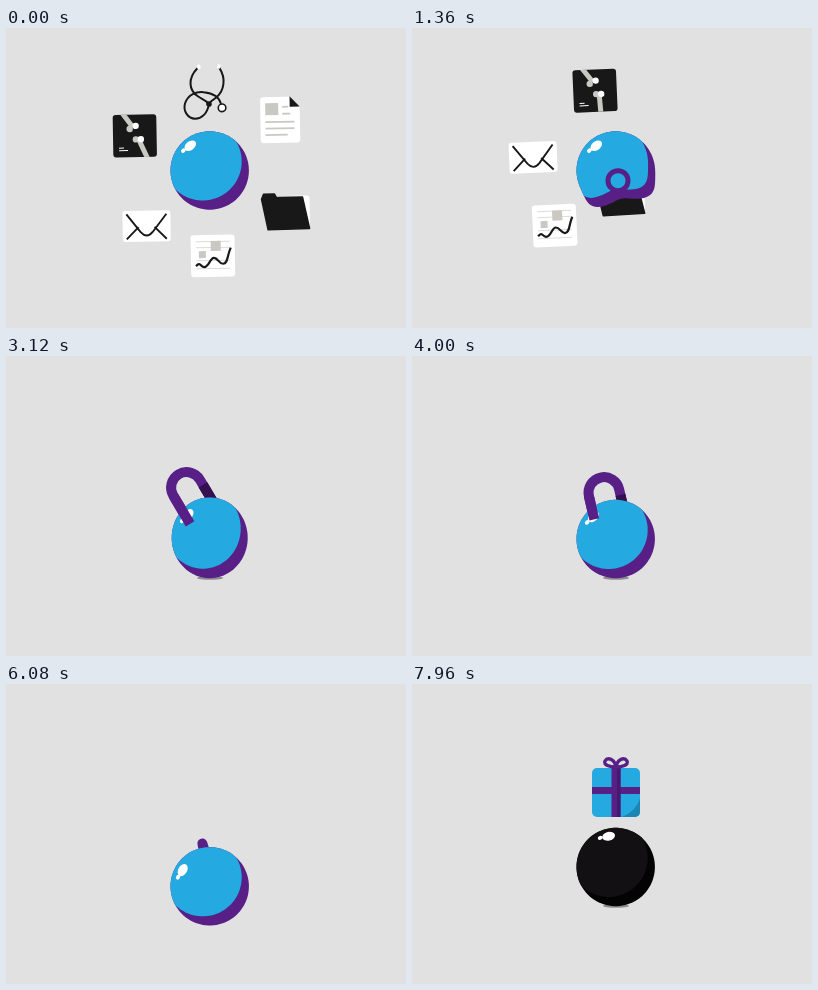
Write an HTML page with a canvas that moves like this. It is 400 px wide and 300 px high and loops after 8000 ms.

```html
<!DOCTYPE html>
<html>
<head>
<meta charset="utf-8">
<style>
  html, body { margin: 0; width: 100%; height: 100%; overflow: hidden; background: #e1e1e1; }
  canvas { display: block; width: 100vw; height: 100vh; }
</style>
</head>
<body>
<canvas id="stage" width="400" height="300"></canvas>
<script>
const ctx = document.getElementById('stage').getContext('2d');
const BLUE = '#25a9e1', PURPLE = '#581f87', DARK_PURPLE = '#35104f';
const BLACK = '#181818', WHITE = '#fff', GREY = '#c9c8c3';
const { PI, sin, cos, exp, min, max } = Math;
const rad = deg => deg * PI / 180;
const clamp = u => max(0, min(1, u));
const mix = (a, b, u) => a + (b - a) * u;
const smooth = u => (u = clamp(u), u * u * (3 - 2 * u));

function fill(color) { ctx.fillStyle = color; ctx.fill(); }
function stroke(color, width) {
  ctx.strokeStyle = color;
  ctx.lineWidth = width;
  ctx.stroke();
}
function box(x, y, w, h, color, r = 0) {
  ctx.beginPath();
  ctx.roundRect(x, y, w, h, r);
  fill(color);
}
function dot(x, y, rx, color, ry = rx, turn = 0) {
  ctx.beginPath();
  ctx.ellipse(x, y, rx, ry, turn, 0, 2 * PI);
  fill(color);
}
function poly(...p) {
  ctx.beginPath();
  for (let i = 0; i < p.length; i += 2) ctx.lineTo(p[i], p[i + 1]);
}
function line(color, width, ...p) { poly(...p); stroke(color, width); }
function curve(d, color, width) {
  ctx.strokeStyle = color;
  ctx.lineWidth = width;
  ctx.stroke(new Path2D(d));
}
function placed(x, y, turn, draw) {
  ctx.save();
  ctx.translate(x, y);
  ctx.rotate(turn);
  draw();
  ctx.restore();
}

// Icons, each drawn around its own centre
function stethoscope() {
  curve('M-8-20C-18-10-17 2-8 8C-4 11 0 12 2 15M14-20C21-9 18 3 11 9C7 12 4 14 2 16', BLACK, 2);
  curve('M3 16C1 26-5 30.5-11 30.5C-19 30-23 22-21 15C-18 6-9 3-2 4C7 5 13 8 15 16', BLACK, 2);
  line(WHITE, 4, -8, -21, -5, -22);
  line(WHITE, 4, 12, -22, 15, -21);
  dot(3, 16, 2.8, BLACK);
  dot(16, 20, 3.8, WHITE);
  stroke(BLACK, 1.6);
}
function report() {
  box(-20, -23, 39.5, 46, WHITE, 3);
  poly(9, -24, 20, -24, 20, -13);
  fill('#e1e1e1');
  poly(9.5, -23.5, 19.5, -13, 9.5, -13);
  fill(BLACK);
  box(-15, -17, 13, 12, GREY);
  for (const [y, x, w] of [[-14, 2, 6], [-7, 2, 8], [1, -15, 29], [7.5, -15, 29], [14, -15, 22]])
    box(x, y, w, 1.8, GREY);
}
function folder() {
  box(-18, -16, 41, 33, WHITE, 3);
  poly(-25, -13, -23, -18, -12, -18, -10, -14.5, 16, -14.5, 22.5, 17, -19, 17.5);
  ctx.closePath();
  ctx.lineJoin = 'round';
  fill(BLACK);
  stroke(BLACK, 1.5);
}
function chart() {
  box(-22, -21, 44, 42, WHITE, 3);
  for (const y of [-15, -9, 4, 12]) box(-17, y, 34, 1, '#dcdcd8');
  box(-2, -15, 10, 10, GREY);
  box(-14, -5, 7, 7, GREY);
  curve('M-17 10C-13 5-12 11-9 11C-4 11-3 2 1 2C5 2 6 8 10 8C15 8 14 0 18-8', BLACK, 2.2);
}
function envelope() {
  box(-24, -15.5, 48, 31, WHITE, 3);
  curve('M-20-12L-6 6Q0 13 6 6L20-12M-20 13L-8 1M20 13L8 1', BLACK, 1.9);
}
function xray(t) {
  box(-21.8, -21.2, 43.6, 42.4, BLACK, 3);
  ctx.save();
  ctx.clip();
  line(GREY, 5, -2, -9, -13, -24);
  line(GREY, 5, 4, 4, mix(13, 5, clamp(t / 1360)), 24);
  for (const x of [-5, 1]) dot(x, x < 0 ? -7 : -10, 3.2, x < 0 ? GREY : WHITE);
  for (const x of [1, 6]) dot(x, 3.5, 3.2, x < 5 ? GREY : WHITE);
  ctx.restore();
  box(-16, 11.5, 5, 1, WHITE);
  box(-16, 14, 9, 1, WHITE);
}

// [draw, start angle, orbit radius]
const icons = [[stethoscope, -93, 83], [report, -36, 87], [folder, 28, 87],
  [chart, 88, 85], [envelope, 139, 84], [xray, 205, 83]];
const orbitAngle = (start, t) => rad(start + 0.037 * t);
const sinceSuction = (i, t) => t - 618 - 226 * i;

function drawIcons(t) {
  icons.forEach(([draw, start, radius], i) => {
    const p = sinceSuction(i, t), u = clamp(p / 350);
    if (u >= 1) return;
    const a = orbitAngle(start, t), d = radius * (1 - u * u);
    const tilt = -1 - 1.5 * clamp(t / 560) - 12 * u * u * (1 - sin(a));
    placed(204 + d * cos(a), 143 + d * sin(a), rad(tilt), () => draw(t));
  });
}
function drawRings(t) {
  icons.forEach(([, start], i) => {
    const p = sinceSuction(i, t);
    if (p < 232 || p > 298) return;
    const a = orbitAngle(start, t), d = 59 - 1.26 * (p - 252), u = clamp((59 - d) / 48);
    ctx.beginPath();
    ctx.arc(204 + d * cos(a), 143 + d * sin(a), mix(12, 10, u), 0, 2 * PI);
    stroke(d < 40 ? PURPLE : BLUE, mix(2, 5, u));
  });
}
function dentsAt(t) {
  return icons.flatMap(([, start], i) => {
    const q = sinceSuction(i, t) - 182;
    if (q < 0 || q > 400) return [];
    return [[orbitAngle(start, t), 24 * sin(PI * q / 170) * exp(-q / 150)]];
  });
}

function blob(cx, cy, r, dents) {
  ctx.beginPath();
  for (let i = 0; i < 90; i++) {
    const a = i * PI / 45;
    let d = r;
    for (const [at, depth] of dents) {
      const off = Math.abs(Math.atan2(sin(a - at), cos(a - at)));
      d -= depth * (exp(-((off / 0.5) ** 2)) - 0.4 * exp(-(((off - 0.8) / 0.3) ** 2)));
    }
    ctx.lineTo(cx + d * cos(a), cy + d * sin(a));
  }
  ctx.closePath();
}
function drawBall(y, shine, squash = 0, size = 1, dents = [], light = BLUE, dark = PURPLE) {
  ctx.save();
  ctx.translate(203.7, y + 39.5);
  ctx.scale(size * (1 + squash), size * (1 - squash));
  ctx.translate(0, -39.5);
  blob(0, 0, 39.2, dents);
  fill(dark);
  ctx.clip();
  blob(-7, -9, 39, dents);
  fill(light);
  ctx.rotate(rad(shine));
  dot(31.5, 0, 4.4, WHITE, 6.5);
  dot(33 * cos(0.26), -33 * sin(0.26), 2, WHITE, 2.5);
  ctx.restore();
}

function drawShackle(s, front) {
  placed(s.x, s.y, rad(s.angle), () => {
    ctx.beginPath();
    if (front) {
      if (s.len <= 0 || s.w < 8) return;
      ctx.moveTo(-s.w, -s.len);
      ctx.lineTo(-s.w, 0);
      stroke(PURPLE, 10);
      return;
    }
    ctx.lineJoin = 'round';
    ctx.moveTo(-s.w, 0);
    ctx.lineTo(-s.w, -s.len);
    ctx.ellipse(0, -s.len, s.w, 15.5, 0, PI, 2 * PI);
    ctx.lineTo(s.w, 0);
    stroke(PURPLE, 10);
    line(DARK_PURPLE, 10, s.w, 6 - s.len, s.w, 6);
  });
}
function shackleAt(t, drop) {
  const p = t - 2980, fade = clamp((1020 - p) / 400), turn = smooth((t - 5360) / 660);
  return {
    x: mix(197.4, 202, turn),
    y: 160 + drop,
    w: mix(15.5, 0.2, turn),
    len: mix(24 - 60 * exp(-p / 200) * cos(p / 75) * fade, 5, turn),
    angle: mix(-13 - 35 * exp(-p / 250) * sin(p / 130) * fade, -16, turn)
  };
}

function drawGift(y) {
  placed(204, y, 0, () => {
    box(-24, -19, 48, 49, BLUE, 5);
    ctx.save();
    ctx.clip();
    ctx.beginPath();
    ctx.moveTo(25, 7);
    ctx.quadraticCurveTo(22, 25, 3, 31);
    ctx.lineTo(25, 31);
    fill('#1b86b4');
    box(-4.5, -19, 9, 49, PURPLE);
    box(-24, 0, 48, 7, PURPLE);
    box(1, -19, 3.5, 49, '#47186f');
    ctx.restore();
    curve('M0-20C-6-20-13-22-11-26C-8-31-1-27 0-20C1-27 8-31 11-26C13-22 6-20 0-20', PURPLE, 3.4);
  });
}
function drawShadow(alpha) {
  ctx.globalAlpha = clamp(alpha);
  dot(204, 222, 13, '#8d8d8f', 1.7);
  ctx.globalAlpha = 1;
}
const wobble = (q, amount) => q < 0 || q > 520 ? 0 : amount * exp(-q / 120) * cos(q / 48);

function orbitScene(t) {
  drawIcons(t);
  drawBall(142.5, 232, 0, 1, dentsAt(t));
  drawRings(t);
}
function lockScene(t) {
  const landed = t >= 2940, drop = 36 * 2 ** ((t - 6160) / 88);
  let y = 183 + drop;
  if (!landed) {
    const fall = clamp((t - 2740) / 200);
    y = 142.5 - 12 * smooth((t - 2600) / 140) + 52.5 * fall * fall;
  }
  const shine = mix(mix(232, 225, smooth((t - 2740) / 400)), 211, smooth((t - 5360) / 660));
  const shackle = t >= 2980 && shackleAt(t, drop);
  drawShadow(min((t - 2840) / 100, (5900 - t) / 300));
  if (shackle) drawShackle(shackle, false);
  drawBall(y, shine, wobble(t - 2940, 0.17));
  if (shackle) drawShackle(shackle, true);
}
function giftScene(t) {
  const q = t - 7480;
  drawShadow((t - 7280) / 120);
  if (q > 0) drawGift(103 + 80 * exp(-q / 220) * cos(q / 85) * clamp(1 - q / 480));
  drawBall(183, 257, wobble(t - 7400, 0.24), clamp((t - 7270) / 120), [], '#121012', '#040304');
}

function frame(now) {
  const t = now % 8000;
  ctx.fillStyle = '#e1e1e1';
  ctx.fillRect(0, 0, 400, 300);
  if (t < 2600) orbitScene(t);
  else if (t < 6360) lockScene(t);
  else if (t >= 7280) giftScene(t);
  requestAnimationFrame(frame);
}
requestAnimationFrame(frame);
</script>
</body>
</html>
```
